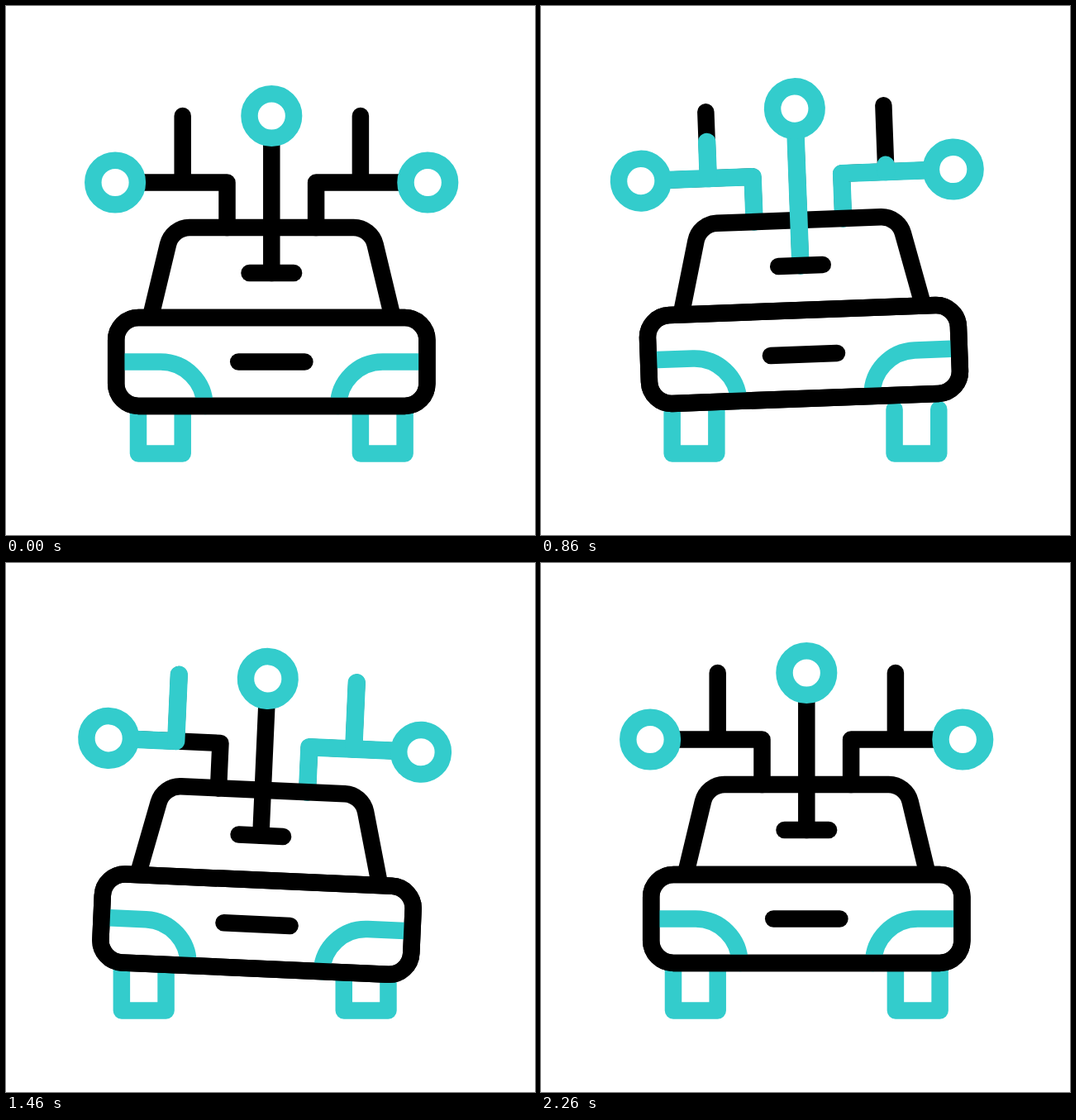
These frames come from a looping animation (640 by 640 pixels, 2400 ms). An HTML page:

```html
<!DOCTYPE html>
<html lang="en">
<head>
<meta charset="utf-8">
<style>
  html, body { margin: 0; width: 100%; height: 100%; overflow: hidden; background: #fff; }
  svg { display: block; width: 100%; height: 100%; }
  path, rect, circle { fill: none; stroke: #000; stroke-width: 20.5; stroke-linecap: round; stroke-linejoin: round; }
  .teal { stroke: #3cc; }
  .pulse { stroke: #3cc; stroke-width: 21.4; }
  .white { fill: #fff; }
</style>
</head>
<body>
<svg viewBox="0 0 640 640">
  <g id="wheels">
    <path class="teal" d="M160 488V541.6H213.7V488M428.9 488V541.6H482.6V488"/>
  </g>
  <g id="body">
    <path d="M267.5 268V213.5H159M375.1 268V213.5H483.5M213.7 213.5V133M428.9 213.5V133"/>
    <path class="pulse" id="leftArm" pathLength="1" d="M267.5 268V213.5H159"/>
    <path class="pulse" id="rightArm" pathLength="1" d="M483.5 213.5H375.1V268"/>
    <path class="pulse" id="leftSpur" pathLength="1" d="M213.7 213.5V133"/>
    <path class="pulse" id="rightSpur" pathLength="1" d="M428.9 213.5V133"/>
    <path d="M175.5 374L196 288.5A27 27 0 0 1 222 268H420.6A27 27 0 0 1 446.6 288.5L467.1 374"/>
    <path d="M321.3 323V160"/>
    <path class="pulse" id="mast" pathLength="1" d="M321.3 323V160"/>
    <path d="M294.5 323H348.1"/>
    <circle class="teal white" cx="321.3" cy="133" r="26.8"/>
    <circle class="teal white" cx="132.1" cy="213.5" r="26.8"/>
    <circle class="teal white" cx="510.3" cy="213.5" r="26.8"/>
    <rect class="white" x="133.2" y="377" width="376.2" height="107" rx="27"/>
    <path class="teal" d="M137 430.5H187A53.6 53.6 0 0 1 240.5 484M505.6 430.5H455.6A53.6 53.6 0 0 0 402.1 484"/>
    <rect x="133.2" y="377" width="376.2" height="107" rx="27"/>
    <path d="M281.2 430.5H361.4"/>
  </g>
</svg>
<script>
const LOOP = 2400, MOVE_END = 2260, PULSE = 300;
const $ = id => document.getElementById(id);

// [time, value] keys, eased in and out
const sway = [[0, 0], [580, -44], [1100, 32.5], [1630, -37], [2170, 0]];
const tilt = [[0, 0], [625, -3.1], [1530, 2.65], [2190, 0]];
const bob = [[0, 0], [480, 11.2], [975, -12.3], [1420, 7.2], [1750, -8.4], [2260, 0]];

// start times of drawing on and wiping off
const pulses = {
  mast: [140, 1000],
  leftArm: [310, 1270],
  rightArm: [470, 1460],
  leftSpur: [700, 1515],
  rightSpur: [800, 1760]
};

function ease(u) {
  u = Math.min(1, Math.max(0, u));
  return u * u * (3 - 2 * u);
}

function valueAt(keys, t) {
  let value = keys[0][1];
  for (let i = 1; i < keys.length; i++) {
    const [t0, v0] = keys[i - 1], [t1, v1] = keys[i];
    value += (v1 - v0) * ease((t - t0) / (t1 - t0));
  }
  return value;
}

function drawPulse(id, t) {
  const [on, off] = pulses[id];
  const end = ease((t - on) / PULSE), start = ease((t - off) / PULSE);
  const style = $(id).style;
  style.visibility = end > start ? 'visible' : 'hidden';
  style.strokeDasharray = `${Math.max(0, end - start)} 3`;
  style.strokeDashoffset = -start;
}

function render(now) {
  const t = Math.min(now % LOOP, MOVE_END);
  const x = valueAt(sway, t);
  $('wheels').setAttribute('transform', `translate(${x} 0)`);
  $('body').setAttribute('transform',
    `translate(${x} ${valueAt(bob, t)}) rotate(${valueAt(tilt, t)} 321.3 484)`);
  for (const id in pulses) drawPulse(id, t);
}

let began;
function tick(now) {
  began ??= now;
  render(now - began);
  requestAnimationFrame(tick);
}
render(0);
requestAnimationFrame(tick);
</script>
</body>
</html>
```
